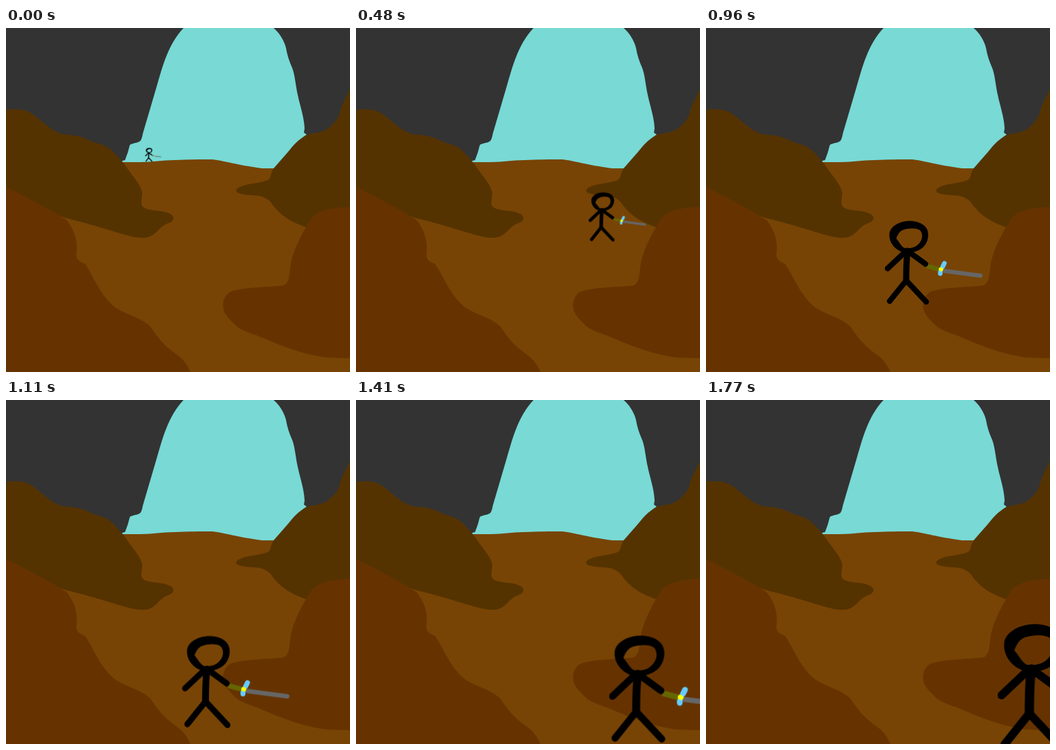
Write an HTML page that moves like this. It is 500 px wide and 500 px high and loops after 1.8 s.

```html
<!DOCTYPE html>
<html lang="en">
<head>
<meta charset="utf-8">
<title>Cave walk</title>
<style>
  html, body { margin: 0; width: 100%; height: 100%; overflow: hidden; background: #333; }
  svg { display: block; width: 100vw; height: 100vh; }
  .hero {
    fill: none;
    stroke-linecap: round;
    stroke-linejoin: round;
    animation: walk 1800ms -1ms infinite;
  }
  /* Every step lasts 30 ms; the origin of the figure is its neck. */
  @keyframes walk {
    0%      { transform: translate(207.5px, 181.5px) scale(.165); animation-timing-function: steps(16); }
    26.666% { transform: translate(357px, 264.5px) scale(.587); animation-timing-function: steps(2); }
    30%     { transform: translate(376px, 277px) scale(.64); animation-timing-function: steps(2); }
    33.333% { transform: translate(391px, 288px) scale(.695); animation-timing-function: steps(4); }
    40%     { transform: translate(350px, 307px) scale(.81); animation-timing-function: steps(8); }
    53.333% { transform: translate(292px, 324px) scale(1); animation-timing-function: steps(2); }
    56.666% { transform: translate(275px, 346px) scale(1.04); animation-timing-function: steps(2); }
    60%     { transform: translate(284px, 381px) scale(1.08); animation-timing-function: steps(5); }
    68.333% { transform: translate(319.5px, 431px) scale(1.175); animation-timing-function: steps(2); }
    71.666% { transform: translate(342px, 438px) scale(1.21); animation-timing-function: steps(8); }
    85%     { transform: translate(475px, 358px) scale(1.35); animation-timing-function: steps(2); }
    88.333% { transform: translate(475px, 362px) scale(1.385); animation-timing-function: steps(6); }
    98.333%, 100% { transform: translate(471.5px, 391px) scale(1.5); }
  }
</style>
</head>
<body>
<svg viewBox="0 0 500 500" preserveAspectRatio="none">
  <rect width="500" height="500" fill="#333"/>
  <!-- cave mouth -->
  <path fill="#78d9d5" d="M258 0C235 25 228 55 219 85L199 153Q197 164 194 165C188 168 184 167 180 170L177 181L173 192L169 193V210H400L437 155L433 152L434 146C433 128 427 112 424 97C421 84 420 68 416 58C411 46 409 40 407 29C404 17 397 7 389 0Z"/>
  <!-- floor -->
  <path fill="#774405" d="M169 195H195C215 195 225 192 245 192C265 191 280 191 300 191C318 193 335 199 372 204H390L500 230V500H0V230Z"/>
  <!-- far rocks -->
  <g fill="#553300">
    <path d="M0 119C20 116 33 119 45 130C60 142 70 152 85 155C100 155 115 159 125 165C140 170 148 171 157 181C165 189 172 197 177 205C188 220 197 230 198 240C198 250 194 255 200 261C210 267 225 264 236 269C246 272 246 281 235 284C222 288 217 306 198 305C175 304 155 293 90 277L0 250Z"/>
    <path d="M500 89C493 104 489 108 484 127C481 134 474 141 468 146C460 152 450 152 437 155C424 163 418 170 410 180L389 204C383 214 386 220 378 222C366 226 350 226 340 231C333 234 333 238 338 240C348 244 362 242 372 245C386 250 386 256 390 260C400 272 412 281 437 290L500 300Z"/>
  </g>
  <!-- near rocks -->
  <g fill="#663300">
    <path d="M0 231C30 246 60 262 88 279C98 292 103 305 103 320C101 338 104 337 115 343C127 360 137 390 160 407C178 418 195 420 210 434C228 462 240 468 254 479Q263 488 268 500H0Z"/>
    <path d="M500 260C475 262 455 263 444 277C432 295 415 325 413 350C411 372 407 375 395 375C375 377 340 377 325 384C314 392 312 408 322 420C335 435 338 438 365 447C400 462 430 474 465 479L500 480Z"/>
  </g>

  <g class="hero">
    <!-- sword -->
    <path d="M54 29L107 36" stroke="#666" stroke-width="6"/>
    <path d="M29 22L48 27" stroke="#660" stroke-width="6.5" stroke-linecap="butt"/>
    <path d="M54.500 18L52 23M48.500 31V33" stroke="#6cf" stroke-width="6.500"/>
    <path d="M49 26.500L50 27" stroke="#ff0" stroke-width="5.500"/>
    <!-- head -->
    <path fill="#000" fill-rule="evenodd" d="M-25.500 -24C-25 -36 -10 -43.500 4 -43.500C18 -43.500 31 -37 31 -24C31 -8 20 2 0 3C-13 2 -26 -9 -25.500 -24ZM-15.500 -18C-14 -23 -10 -30 -4 -31C2 -33 14 -34 19 -30C23 -26 23 -19 20 -14C15 -6 8 -3 -3 -4C-8 -6 -11 -13 -15.500 -18Z"/>
    <!-- body -->
    <g stroke="#000" stroke-width="8">
      <path stroke-width="9" d="M1 0Q-1 14 -1 43"/>
      <path d="M-1 0L-28 25.500M1 0L27 19"/>
      <path d="M-25 73L-1 43L28 74"/>
    </g>
  </g>
</svg>
</body>
</html>
```
